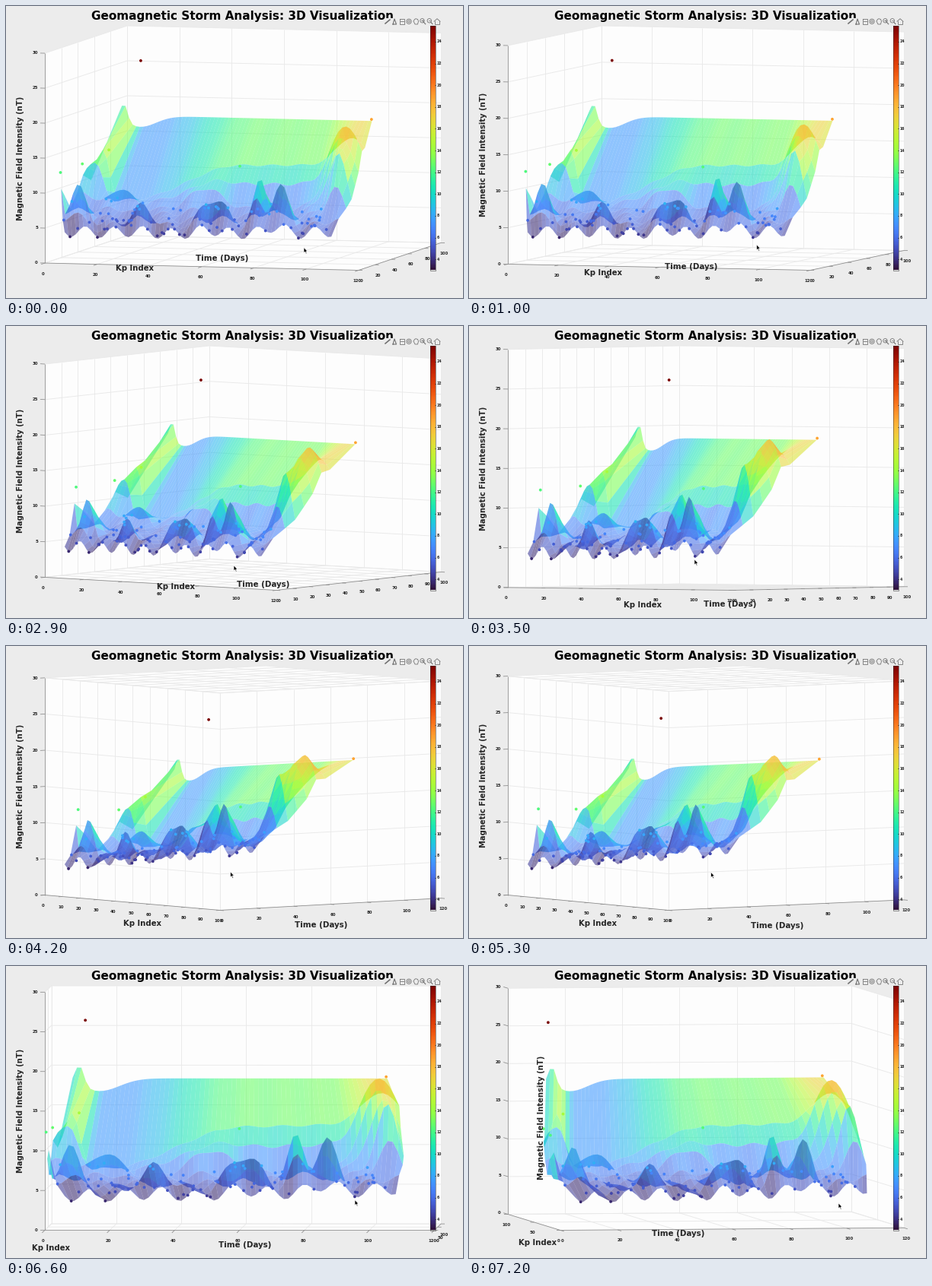
These frames come from a looping animation (600x384 px, 7300 ms). A matplotlib script:

```python
import itertools

import matplotlib
import matplotlib.pyplot as plt
import numpy as np
from matplotlib.animation import FuncAnimation
from matplotlib.collections import LineCollection, PolyCollection
from matplotlib.patches import Circle, Polygon, Rectangle

W, H = 600, 384
FRAMES, STEP = 73, 100
BACK, INK, GREY = "#ececec", "#262626", "#707070"
LEFT, RIGHT, TOP, BOTTOM = 51, 571, 26, 347.5
Z_LOW, Z_HIGH = 3.0, 25.5
PX = 0.72  # points per pixel at 100 dpi

plt.rcParams["font.family"] = "DejaVu Sans"
turbo = matplotlib.colormaps["turbo"]
rng = np.random.default_rng(7)

# Key poses of the mouse drag: seconds, azimuth, elevation, pointer x
POSES = np.array([(0, 14.7, 7.7, 391), (1.0, 17.2, 5.4, 377.5), (2.9, 35.4, 6.0, 299),
                  (4.2, 38.4, -5.1, 294.5), (5.3, 34.3, -4.8, 317.5),
                  (6.1, 10.3, -0.7, 429), (7.2, -8.7, 4.1, 485)])

# Storm peaks: t, k, height, width along t
PEAKS = [(0, 0.17, 6.5, 0.008), (0.06, 0.17, 5, 0.025), (0.03, 0.41, 5, 0.025),
         (0.065, 0.47, 6, 0.018), (0.15, 0.35, 3, 0.035), (0.28, 0.11, 3, 0.04),
         (0.42, 0.35, 3, 0.05), (0.51, 0.11, 4.5, 0.04), (0.644, 0.17, 6.5, 0.02),
         (0.72, 0.11, 6, 0.028), (0.877, 0.23, 7.6, 0.028), (0.85, 0.37, 9.5, 0.045)]
K_ROWS = np.arange(0.05, 0.48, 0.06)
K_BACK = 0.665
# Samples that stand clear of the surface: t, k, z
OUTLIERS = [(0.09, 0.822, 25.8), (0.865, 0.671, 18.8), (0, 0.19, 12.2),
            (0.491, 0.498, 12.4), (0.013, 0.406, 12.6), (0.08, 0.473, 14.4)]


def smooth(u):
    u = np.clip(u, 0, 1)
    return u * u * (3 - 2 * u)


def bell(x, centre, width):
    return np.exp(-((x - centre) / width) ** 2 / 2)


def field(t, k):
    """Height over the bumpy front part of the surface."""
    z = 4 + 7.2 * k + 1.3 * t ** 4
    z += 5.2 * smooth((t - 0.15) / 0.35) * smooth((k - 0.33) / 0.14)
    z -= 0.9 * (1 - k / 0.55) * np.cos(2 * np.pi * ((t - 0.07) / 0.0915 + 4 * (k - 0.05)))
    calm = np.clip((k - 0.02) / 0.09, 0, 1)
    for tp, kp, h, w in PEAKS:
        z += calm * h * bell(t, tp, w) * bell(k, kp, 0.02 + 0.0055 * h)
    return z


def ridge(t):
    """Height of the far edge of the surface."""
    return 18.6 + 2.6 * bell(t, 0.078, 0.011) - 1.6 * bell(t, 0.13, 0.05)


def span(k, u):
    """Place u in 0..1 between the left and right outline at depth k."""
    start = np.interp(k, [0.05, 0.19, 0.4, K_BACK], [0.05, 0, 0.012, 0.06])
    end = np.interp(k, [0.05, 0.2, 0.45, K_BACK], [0.9, 0.92, 0.9, 0.868])
    return start + (end - start) * u


def tint(z, alpha=1.0):
    return turbo((np.asarray(z) * 30 - Z_LOW) / (Z_HIGH - Z_LOW), alpha=alpha)


def build_surface():
    u = np.linspace(0, 1, 72)
    grid = []
    for k in [*K_ROWS, K_BACK]:
        t = span(k, u)
        z = ridge(t) if k == K_BACK else field(t, k)
        grid.append(np.stack([t, np.full_like(t, k), z / 30], axis=-1))
    grid = np.array(grid)
    quads = np.stack([grid[:-1, :-1], grid[:-1, 1:], grid[1:, 1:], grid[1:, :-1]], axis=2)
    return quads.reshape(-1, 4, 3), tint(grid[:-1, :-1, 2].ravel(), 0.58)


def build_dots():
    dots = [(t, k, z / 30) for t, k, z in OUTLIERS]
    while len(dots) < 90:
        k = 0.05 + 0.38 * rng.random() ** 1.8
        t = span(k, rng.random())
        z = field(t, k)
        if z < 8.5:
            dots.append((t, k, z / 30))
    return np.array(dots)


QUADS, QUAD_COLORS = build_surface()
DOTS = build_dots()
DOT_COLORS = tint(DOTS[:, 2])
CORNERS = np.array(list(itertools.product((0, 1), repeat=3)))


def pose(s):
    """Monotone cubic interpolation of the key poses at s seconds."""
    times, values = POSES[:, 0], POSES[:, 1:]
    h = np.diff(times)
    d = np.diff(values, axis=0) / h[:, None]
    a, b = d[:-1], d[1:]
    inner = np.where(a * b > 0, 2 * a * b / (a + b), 0)
    slope = np.vstack([d[:1], inner, d[-1:]])
    i = int(np.clip(np.searchsorted(times, s, side="right") - 1, 0, len(h) - 1))
    u = (s - times[i]) / h[i]
    mix = smooth(u)
    return ((1 - mix) * values[i] + mix * values[i + 1]
            + u * (1 - u) * h[i] * ((1 - u) * slope[i] - u * slope[i + 1]))


def camera(az, el):
    """Return a projector that stretches the box to the plot area, and the view direction."""
    a, e = np.radians([az, el])
    axes = np.array([[np.cos(a), np.sin(a), 0],
                     [-np.sin(e) * np.sin(a), np.sin(e) * np.cos(a), np.cos(e)]])
    toward = np.array([np.cos(e) * np.sin(a), -np.cos(e) * np.cos(a), np.sin(e)])
    flat = CORNERS @ axes.T
    low, high = flat.min(axis=0), flat.max(axis=0)

    def project(p):
        q = (np.asarray(p, float) @ axes.T - low) / (high - low)
        return np.stack([LEFT + q[..., 0] * (RIGHT - LEFT),
                         BOTTOM - q[..., 1] * (BOTTOM - TOP)], axis=-1)

    return project, toward


fig = plt.figure(figsize=(6, 3.84), dpi=100, facecolor=BACK)
ax = fig.add_axes([0, 0, 1, 1])
ax.axis("off")
live = []


def label(x, y, text, size, keep=True, **kw):
    kw = {"ha": "center", "va": "center", "color": INK, "zorder": 6, **kw}
    item = ax.text(x, y, text, fontsize=size * PX, fontweight="bold", **kw)
    if keep:
        live.append(item)


def lines(segments, color, width, zorder):
    live.append(ax.add_collection(LineCollection(
        segments, colors=color, linewidths=width * PX, zorder=zorder)))


def stroke(xs, ys, width=0.8):
    ax.plot(xs, ys, color=GREY, lw=width * PX, zorder=9)


def ring(x, y, r):
    ax.add_patch(Circle((x, y), r, fill=False, ec=GREY, lw=0.8 * PX, zorder=9))


def draw_toolbar():
    ax.add_patch(Rectangle((497, 16), 74, 9.5, fc=BACK, ec="none", zorder=8))
    stroke([498, 504], [23, 18], 1.6)
    stroke([508, 510, 512.5, 508], [24, 17, 24, 24], 1.1)
    stroke([516.5, 523, 523, 516.5, 516.5], [17, 17, 23.5, 23.5, 17])
    stroke([518, 521.5], [20, 20])
    ring(529, 20.3, 3.2)
    ring(529, 20.3, 1.4)
    ax.add_patch(Polygon([(535, 20), (536.5, 17.5), (538, 16.7), (540.5, 17.5),
                          (541.5, 20), (540.5, 24), (537, 24)],
                         fc="none", ec=GREY, lw=0.8 * PX, zorder=9))
    for x in (546.5, 555.8):
        ring(x, 19.3, 2.7)
        stroke([x + 2, x + 4.2], [21.3, 23.8], 1.1)
        stroke([x - 1.3, x + 1.3], [19.3, 19.3], 0.7)
    stroke([546.5, 546.5], [18, 20.6], 0.7)
    stroke([562, 566, 570], [20.3, 16.7, 20.3])
    stroke([563.2, 563.2, 568.8, 568.8], [20, 24, 24, 20])


def draw_colorbar():
    ramp = np.linspace(1, 0, 256)[:, None]
    ax.imshow(ramp, cmap=turbo, extent=(557, 564, 347.5, 25.5), aspect="auto", zorder=7)
    ax.add_patch(Rectangle((557, 25.5), 7, 322, fill=False, ec="#303030",
                           lw=0.5 * PX, zorder=7.5))
    for v in range(4, 26, 2):
        y = 347.5 - (v - Z_LOW) / (Z_HIGH - Z_LOW) * 322
        ax.plot([562.5, 564], [y, y], color=INK, lw=0.6 * PX, zorder=7.5)
        label(566, y, str(v), 4.6, keep=False, ha="left", zorder=7.5)


def outward(project, base, tip, length):
    """Short tick leaving the box at base, heading for tip."""
    a, b = project(base), project(tip)
    d = b - a
    return [a, a + d / max(np.hypot(*d), 1e-6) * length]


def draw_box(project, az, el, k_ticks):
    t_back, z_back = (0 if az > 0 else 1), (0 if el > 0 else 1)
    t_ticks, z_ticks = np.arange(0, 121, 20) / 120, np.arange(0, 31, 5) / 30
    faces = [[(t_back, 0, 0), (t_back, 1, 0), (t_back, 1, 1), (t_back, 0, 1)],
             [(0, 1, 0), (1, 1, 0), (1, 1, 1), (0, 1, 1)],
             [(0, 0, z_back), (1, 0, z_back), (1, 1, z_back), (0, 1, z_back)]]
    live.append(ax.add_collection(PolyCollection(
        project(faces), facecolors="#fdfdfd", edgecolors="none", zorder=1)))
    grid = [[(t_back, 0, z), (t_back, 1, z)] for z in z_ticks]
    grid += [[(0, 1, z), (1, 1, z)] for z in z_ticks]
    for k in k_ticks:
        grid += [[(t_back, k, 0), (t_back, k, 1)], [(0, k, z_back), (1, k, z_back)]]
    for t in t_ticks:
        grid += [[(t, 1, 0), (t, 1, 1)], [(t, 0, z_back), (t, 1, z_back)]]
    lines(project(grid), "#e9e9e9", 0.9, 2)

    # Axes run along the lower outline of the box
    k_edge = 0 if el > 0 else 1
    t_edge = 1 if az * el > 0 else 0
    z_foot = 0 if az > 0 else 1
    rules = [[(0, k_edge, 0), (1, k_edge, 0)], [(t_edge, 0, 0), (t_edge, 1, 0)],
             [(0, z_foot, 0), (0, z_foot, 1)]]
    lines(project(rules), "#8c8c8c", 0.8, 3)

    ticks = []
    t_shift = -2 if t_edge else 3
    for t in t_ticks:
        x, y = project((t, k_edge, 0))
        ticks.append(outward(project, (t, k_edge, 0), (t, 3 * k_edge - 1, 0), 5))
        label(x + t_shift, y + 14, f"{t * 120:.0f}", 5.4)
    for k in k_ticks:
        x, y = project((t_edge, k, 0))
        ticks.append(outward(project, (t_edge, k, 0), (3 * t_edge - 1, k, 0), 5))
        label(x + (4 if t_edge else -2), y + 14, f"{k * 100:.0f}", 5.4)
    for z in z_ticks:
        tip = (0, 2, z) if z_foot else (-1, 0, z)
        ticks.append(outward(project, (0, z_foot, z), tip, 6))
        label(42, ticks[-1][1][1], f"{z * 30:.0f}", 5.4, ha="right")
    lines(ticks, "#8c8c8c", 0.8, 3)


def draw_labels(project, az, el):
    if el > 0 and az > 12:
        k_off, t_off, drop = 64, -81, 25
    elif el > 0:
        k_off, t_off, drop = 4, -2, 27.5
    else:
        k_off, t_off, drop = 13, -12, 27.5
    x, y = project((0, 0.5, 0))
    label(x + k_off, y + drop, "Kp Index", 10.1)
    x, y = project((0.5, 1, 0))
    label(x + t_off, y + drop, "Time (Days)", 10.2)
    x, y = project((0, 0, 0.5))
    label(x - (32 if az > 0 else 25), y, "Magnetic Field Intensity (nT)", 10.0, rotation=90)


def draw_pointer(x, y):
    shape = [(0, 0), (0, 7.2), (1.7, 5.8), (2.9, 8.6), (4.1, 8.1), (2.9, 5.4), (5, 5.2)]
    live.append(ax.add_patch(Polygon([(x + a, y + b) for a, b in shape],
                                     fc="black", ec="white", lw=0.5, zorder=10)))


def draw(i):
    while live:
        live.pop().remove()
    az, el, pointer_x = pose(i * STEP / 1000)
    project, toward = camera(az, el)
    k_span = abs(project((0, 1, 0))[0] - project((0, 0, 0))[0])
    k_step = 50 if k_span < 90 else 20 if k_span < 170 else 10

    draw_box(project, az, el, np.arange(0, 101, k_step) / 100)
    order = np.argsort(QUADS.mean(axis=1) @ toward)
    live.append(ax.add_collection(PolyCollection(
        project(QUADS[order]), facecolors=QUAD_COLORS[order], edgecolors="none",
        antialiaseds=True, zorder=4)))
    spots = project(DOTS)
    live.append(ax.scatter(spots[:, 0], spots[:, 1], s=(3.8 * PX) ** 2, c=DOT_COLORS,
                           linewidths=0, zorder=5))
    draw_labels(project, az, el)
    draw_pointer(pointer_x, 305 + el / 0.62)  # the tilt follows the pointer's height
    return live


label(310.5, 13.5, "Geomagnetic Storm Analysis: 3D Visualization", 15.3,
      keep=False, color="black")
draw_toolbar()
draw_colorbar()
ax.set_xlim(0, W)
ax.set_ylim(H, 0)

anim = FuncAnimation(fig, draw, frames=FRAMES, init_func=lambda: live,
                     interval=STEP, repeat=True, repeat_delay=0, blit=False)
plt.show()
```
